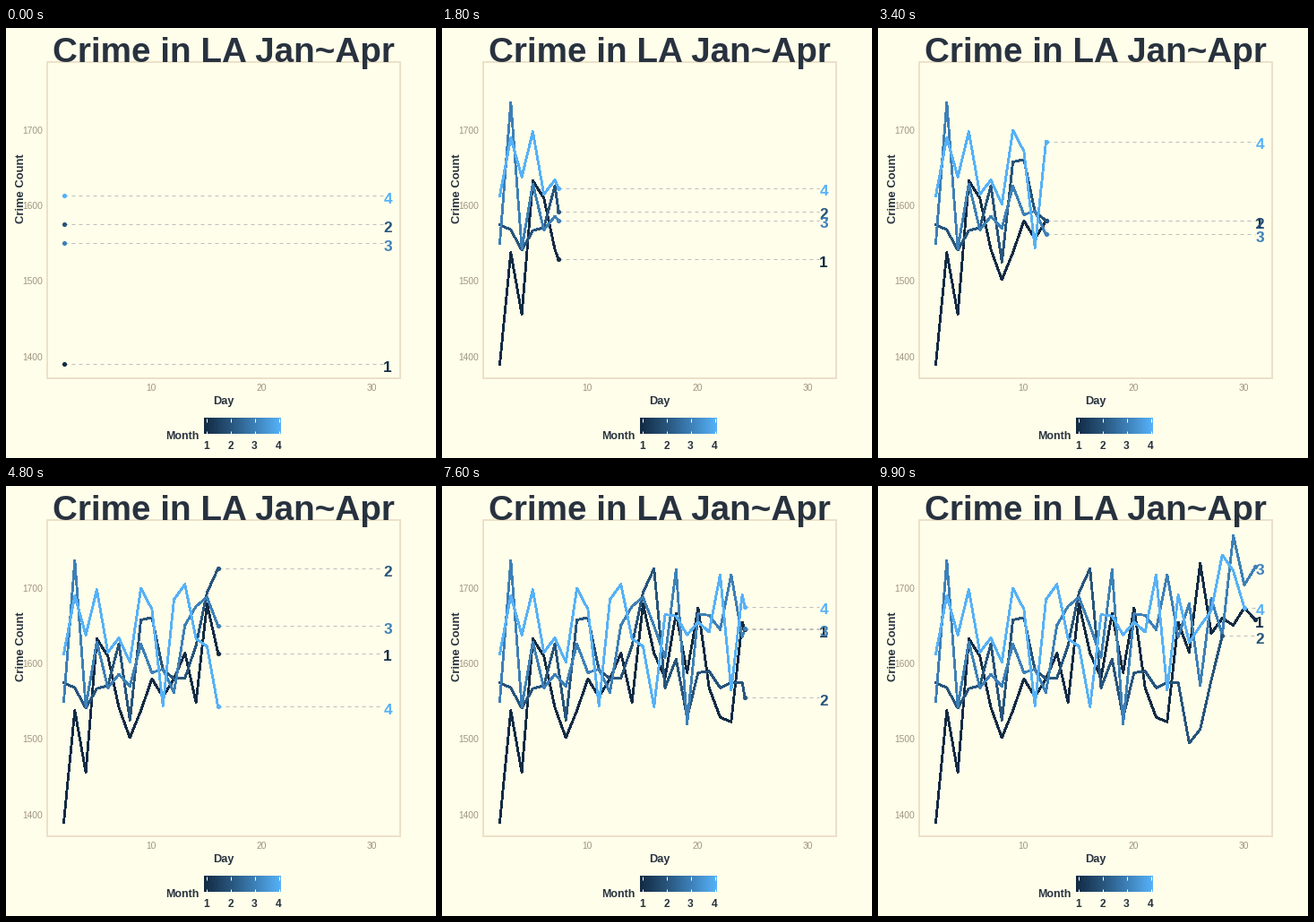
Animation of 480x480 px, one loop 10 s. Source, as a matplotlib script:

```python
import numpy as np
import matplotlib.pyplot as plt
from matplotlib.animation import FuncAnimation
from matplotlib.colors import LinearSegmentedColormap
from matplotlib.patches import Rectangle

SIZE, DPI, FRAMES, INTERVAL = 480, 100, 100, 100
PT = 72 / DPI  # points per pixel

BACK, BORDER = "#fffeea", "#ece0c8"
INK, MUTED = "#28323f", "#a0957f"
COLORS = ["#132b43", "#27547b", "#3d80b7", "#56b1f7"]

FIRST, LAST = 2, 31
COUNTS = [
    [1390, 1538, 1456, 1633, 1610, 1542, 1502, 1538, 1580, 1556,
     1580, 1614, 1549, 1679, 1614, 1581, 1667, 1588, 1674, 1568,
     1529, 1523, 1655, 1615, 1733, 1640, 1660, 1651, 1674, 1658],
    [1575, 1568, 1541, 1567, 1571, 1626, 1525, 1658, 1661, 1592,
     1580, 1581, 1624, 1694, 1726, 1568, 1606, 1529, 1588, 1590,
     1568, 1575, 1575, 1495, 1513, 1578, 1637],
    [1550, 1737, 1543, 1629, 1568, 1586, 1570, 1626, 1588, 1593,
     1562, 1651, 1676, 1688, 1650, 1608, 1725, 1520, 1666, 1664,
     1645, 1718, 1635, 1680, 1571, 1686, 1638, 1770, 1704, 1728],
    [1613, 1690, 1638, 1698, 1615, 1634, 1602, 1700, 1672, 1544,
     1685, 1705, 1633, 1623, 1543, 1665, 1663, 1638, 1655, 1642,
     1718, 1565, 1691, 1628, 1650, 1670, 1744, 1723, 1674],
]


def day_x(day):
    return 64.5 + 12.3 * (day - FIRST)


def count_y(count):
    return 114 + 0.8433 * (1700 - count)


plt.rcParams["font.family"] = "Liberation Sans"
fig = plt.figure(figsize=(SIZE / DPI, SIZE / DPI), dpi=DPI, facecolor=BACK)
ax = fig.add_axes([0, 0, 1, 1])
ax.set_xlim(0, SIZE)
ax.set_ylim(SIZE, 0)
ax.axis("off")


def label(x, y, text, px, color=INK, weight="bold", ha="center", **kw):
    return ax.text(x, y, text, fontsize=px * PT, color=color, weight=weight,
                   ha=ha, va="baseline", **kw)


# Panel, axes and titles
ax.add_patch(Rectangle((46, 38), 394, 353, fill=False, ec=BORDER,
                       lw=2 * PT, zorder=1))
for count in (1400, 1500, 1600, 1700):
    label(41.5, count_y(count) + 3.6, str(count), 10.2, MUTED, "normal", "right")
for day in (10, 20, 30):
    label(day_x(day) - 0.8, 405.2, str(day), 10.2, MUTED, "normal")
label(242.5, 37.5, "Crime in LA Jan~Apr", 38.6)
label(242.5, 419.6, "Day", 12.8)
label(17, 215, "Crime Count", 13, rotation=90)

# Colour bar
label(178, 458.6, "Month", 12.4, ha="left")
cmap = LinearSegmentedColormap.from_list("month", COLORS)
ax.imshow(np.linspace(0, 1, 87)[None], cmap=cmap, aspect="auto",
          extent=(221, 307, 453.5, 436), interpolation="nearest", zorder=1)
ax.set_xlim(0, SIZE)
ax.set_ylim(SIZE, 0)
for month in range(4):
    x = 223.5 + 27 * month
    for top in (436, 450):
        ax.plot([x, x], [top, top + 3.5], color="white", lw=PT, zorder=2,
                solid_capstyle="butt")
    label(x, 470, str(month + 1), 12)


class Series:
    """One month's line, guide, dot and number."""

    def __init__(self, month, counts):
        days = np.arange(FIRST, FIRST + len(counts))
        self.x, self.y = day_x(days), count_y(np.array(counts))
        # every day is reached on a whole frame
        self.keys = np.round((FRAMES - 1) * (days - FIRST) / (LAST - FIRST))
        color = COLORS[month]
        self.line, = ax.plot([], [], color=color, lw=1.8 * PT, zorder=3,
                             antialiased=False, solid_joinstyle="round")
        self.guide, = ax.plot([], [], color="#bebebe", lw=PT, zorder=4,
                              dashes=(4, 4), dash_capstyle="butt")
        self.dot, = ax.plot([], [], "o", color=color, ms=5.2 * PT, mew=0,
                            zorder=5)
        self.tag = label(421.3, 0, str(month + 1), 17.2, color, ha="left",
                         zorder=6)

    def show(self, frame):
        x = np.interp(frame, self.keys, self.x)
        y = np.interp(frame, self.keys, self.y)
        done = self.keys < frame
        self.line.set_data(np.append(self.x[done], x),
                           np.append(self.y[done], y))
        self.guide.set_data([x, day_x(LAST)], [y, y])
        self.dot.set_data([x], [y])
        self.tag.set_y(y + 8.5)


plt.rcParams["lines.scale_dashes"] = True
series = [Series(m, c) for m, c in enumerate(COUNTS)]


def update(frame):
    for s in series:
        s.show(frame)
    return []


anim = FuncAnimation(fig, update, frames=FRAMES, interval=INTERVAL,
                     repeat=True, repeat_delay=0, blit=False)
plt.show()
```
